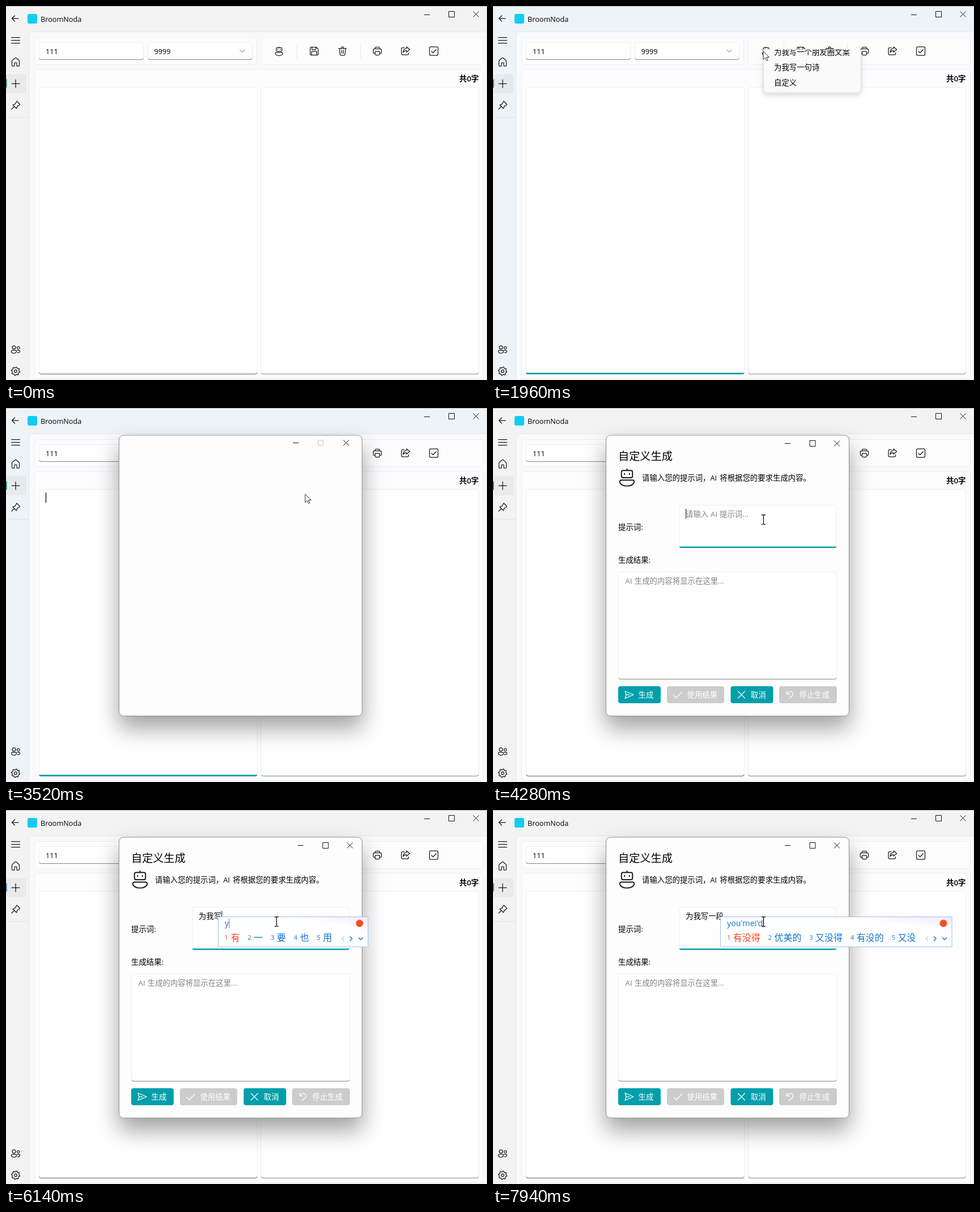
An HTML page that plays this animation: 849x660 px, repeating every 8 s.

```html
<!DOCTYPE html>
<html lang="zh-CN">
<head>
<meta charset="utf-8">
<title>BroomNoda</title>
<style>
html, body { margin: 0; width: 100%; height: 100%; overflow: hidden; background: #f3f3f3; }
svg { display: block; width: 849px; height: 660px; }
text { font-family: "Open Sans", "Noto Sans CJK SC", "Noto Sans CJK", sans-serif; font-size: 13.4px; white-space: pre; }
.lat { font-size: 12.7px; }
.hint { fill: #858585; }
.ico { fill: none; stroke: #1a1a1a; stroke-width: 1.25; stroke-linecap: round; stroke-linejoin: round; }
.cap { fill: none; stroke: #111; stroke-width: 1; }
</style>
</head>
<body>
<svg id="stage" viewBox="0 0 849 660" xmlns="http://www.w3.org/2000/svg"></svg>
<script>
const LOOP = 8000, STEP = 67.3;
const TEAL = '#009faa';
const stage = document.getElementById('stage');

// ---- drawing helpers ----
const rect = (x, y, w, h, r, fill, extra = '') =>
  `<rect x="${x}" y="${y}" width="${w}" height="${h}" rx="${r}" fill="${fill}" ${extra}/>`;
const card = (x, y, w, h, r = 4, fill = '#fcfcfc') =>
  rect(x + .5, y + .5, w - 1, h - 1, r, fill, 'stroke="#eeeeee"');
const text = (x, y, s, extra = '') => `<text x="${x}" y="${y}" ${extra}>${s}</text>`;
const icon = (x, y, d, extra = '') =>
  `<path class="ico" transform="translate(${x} ${y})" d="${d}" ${extra}/>`;
const caption = (x, y, d, extra = '') =>
  `<path class="cap" transform="translate(${x} ${y})" d="${d}" ${extra}/>`;
const underline = (x, y, w, color, thick, extra = '') =>
  `<path d="M${x + .7} ${y - 3}q.4 2.5 3.3 2.5h${w - 8}q2.9 0 3.3 -2.5" fill="none" stroke="${color}" stroke-width="${thick}" ${extra}/>`;
const focusLine = (id, x, y, w) =>
  `<path id="${id}" d="M${x} ${y - 2.6}h${w}q-.4 2.6 -3 2.6h${6 - w}q-2.600 0 -3 -2.6z" fill="${TEAL}"/>`;
const field = (x, y, w, h, color) =>
  card(x, y, w, h, 4, '#fefefe') + underline(x, y + h, w, color, 1);

const MIN = 'M-5 0H5', MAX = 'M-5 -5H5V5H-5Z', CLOSE = 'M-5 -5L5 5M5 -5L-5 5';
const ROBOT = 'M-3.500 -6.500h7q1.500 0 1.500 1.500v3.500q0 1.500 -1.500 1.500h-7q-1.500 0 -1.500 -1.500v-3.500q0 -1.500 1.500 -1.500zM0 -6.500v-1.300' +
  'M-2.200 -3.700v.8M2.200 -3.700v.8M-5 2.200h10q1.500 0 1.500 1.300c0 2.500 -3 4 -6.500 4s-6.500 -1.500 -6.500 -4q0 -1.300 1.500 -1.300z';
const SAVE = 'M-5.500 -7h9l3.500 3.500v9q0 1.500 -1.500 1.500h-11q-1.500 0 -1.500 -1.500v-11q0 -1.500 1.500 -1.500zM-4 -7v3.500q0 1 1 1h5q1 0 1 -1v-3.500M-4.500 7v-5.500q0 -1 1 -1h7q1 0 1 1v5.500';
const TRASH = 'M-7 -4.500h14M-2.200 -4.500q0 -2.800 2.200 -2.800t2.200 2.800M-5.500 -4.500l1.100 10.400q.2 1.600 1.700 1.600h5.400q1.500 0 1.700 -1.600l1.100 -10.400M-1.500 -1.500v5.500M1.500 -1.500v5.500';
const PRINT = 'M-4 -4v-1.500q0 -1.500 1.500 -1.500h5q1.500 0 1.500 1.500v1.500M-4 4h-1.500q-1.700 0 -1.700 -1.700v-3.800q0 -2.500 2.500 -2.500h9.400q2.500 0 2.500 2.500v3.800q0 1.700 -1.700 1.700h-1.500M-4 1.500q0 -1 1 -1h6q1 0 1 1v4q0 1.500 -1.500 1.500h-5q-1.500 0 -1.500 -1.500z';
const SHARE = 'M-2 -6h-3q-2 0 -2 2v8.500q0 2 2 2h8.500q2 0 2 -2v-1.500M2 -7.500l5.500 4.800l-5.500 4.800v-2.700q-4 0 -6 3q.4 -6.500 6 -7.100z';
const CHECK = 'M-5.500 -7.500h11q2 0 2 2v11q0 2 -2 2h-11q-2 0 -2 -2v-11q0 -2 2 -2zM-4 .5l2.700 2.700l5.500 -5.700';
const HOME = 'M-6.500 -1.500q0 -1 .8 -1.700l4.600 -4q1.100 -.9 2.200 0l4.600 4q.8 .7 .8 1.700v7.500q0 1.200 -1.200 1.200h-2.300q-1 0 -1 -1v-4q0 -1 -1 -1h-2q-1 0 -1 1v4q0 1 -1 1h-2.300q-1.200 0 -1.200 -1.200z';
const PIN = 'M2 -7l5 5q1 1.200 -.5 2l-3.300 1.600l-1.700 4.400l-6.500 -6.500l4.400 -1.700l1.600 -3.300q.5 -1.200 1 -1.500zM-2.700 2.800l-4.500 4.400';
const PEOPLE = 'M-6 -3.500a3 3 0 1 1 6 0a3 3 0 1 1 -6 0M2.500 -2.700a2.200 2.200 0 1 1 4.400 0a2.200 2.200 0 1 1 -4.400 0M-5.800 1.500h5.600q1.700 0 1.700 1.600c0 2.500 -2 3.700 -4.500 3.700s-4.500 -1.200 -4.500 -3.700q0 -1.600 1.700 -1.600zM3 1.500h3q1.600 0 1.600 1.500c0 2 -1.600 3 -4.100 2.700';

function gear() {
  let d = '';
  for (let i = 0; i < 32; i++) {
    const a = (i + .5) * Math.PI / 16, r = i % 4 < 2 ? 7.5 : 5.800;
    d += (i ? 'L' : 'M') + (r * Math.cos(a)).toFixed(1) + ' ' + (r * Math.sin(a)).toFixed(1);
  }
  return d + 'zM-2.300 0a2.300 2.300 0 1 1 4.600 0a2.300 2.300 0 1 1 -4.600 0';
}

function button(x, w, label, glyph, on) {
  return rect(x, 491, w, 30, 4, on ? TEAL : '#cccccc') +
    icon(x + 19, 506, glyph, 'style="stroke:#fff"') +
    text(x + 35.5, 511, label, 'fill="#fff"');
}

// ---- scene ----
const mainWindow = `
  <rect id="base" width="849" height="660"/>
  <path id="panel" d="M40.500 660V53.500q0 -8 8 -8H849V660z" stroke="#e6e8ea"/>
  <path d="M0 .5H849" stroke="#b9bbbd"/><path d="M848.500 0V660" stroke="#dedede"/>` +
  icon(16.5, 22, 'M5.500 0h-11.500M-1 -5l-5 5l5 5') +
  rect(38, 14, 17, 17, 3, '#12cdf2') +
  text(61, 27.5, 'BroomNoda', 'class="lat"') +
  caption(743, 15.5, MIN) + caption(786.5, 14.5, MAX) + caption(829.5, 14.5, CLOSE) +
  rect(0, 120, 36, 34, 4, '#000', 'fill-opacity=".04"') + rect(0, 129, 1.5, 15, .5, '#178089') +
  icon(17, 60.5, 'M-7.500 -5h15M-7.500 0h15M-7.500 5h15') + icon(17, 99, HOME) +
  icon(17, 137, 'M-7 0h14M0 -7v14') + icon(17, 175, PIN) +
  '<path d="M0 196.500H40" stroke="#000" stroke-opacity=".07"/>' +
  icon(17, 606, PEOPLE) + icon(17, 644.5, gear()) +
  card(50, 55, 393, 49, 5) + card(450, 55, 393, 49, 5) + card(50, 111, 793, 547, 5) +
  field(58, 64, 185, 31, '#858585') + field(250, 64, 185, 31, '#858585') +
  text(70, 84.5, '111', 'class="lat"') + text(261.5, 84.5, '9999', 'class="lat"') +
  icon(417, 79.5, 'M-4 -2l4 4l4 -4', 'style="stroke:#666;stroke-width:1"') +
  icon(482, 80, ROBOT) + icon(544, 79.5, SAVE) + icon(594, 79.5, TRASH) +
  icon(655.5, 79.5, PRINT) + icon(705, 79.5, SHARE) + icon(755, 79.5, CHECK) +
  '<path d="M513.500 65V94M625.500 65V94" stroke="#e8e8e8"/>' +
  text(834.5, 133, '共0字', 'text-anchor="end" font-weight="600"') +
  field(58, 143, 386, 507, '#616161') + field(450, 143, 385, 507, '#8a8a8a') +
  focusLine('editFocus', 58, 649.8, 385) +
  '<path id="editCaret" d="M70.500 149.500V167" stroke="#111" stroke-width="1.4"/>';

const menu = `<g id="menu" clip-path="url(#menuClip)"><g id="menuBody">` +
  rect(477.5, 85.5, 172, 91.5, 7, '#fafafa', 'stroke="#dcdcdc" filter="url(#soft)"') +
  rect(484, 0, 160, 26.5, 4, '#f0f0f0', 'id="hover"') +
  ['为我写一个朋友圈文案', '为我写一句诗', '自定义'].map((s, i) => text(496, 110 + i * 26.7, s)).join('') +
  '</g></g>';

const dialog = `<g id="dialog">` +
  rect(199.5, 48, 429, 495.5, 8, '#fdfdfd', 'stroke="#8d8d8d" filter="url(#deep)"') +
  '<g id="blank">' + caption(511.5, 61.5, MIN) + caption(555.5, 61.5, 'M-4.500 -4.500h9v9h-9z', 'style="stroke:#c4c4c4"') + caption(600.5, 61.5, CLOSE) + '</g>' +
  '<g id="form">' + caption(520, 62.5, MIN) + caption(564, 62.5, MAX) + caption(607, 62.5, CLOSE) +
  text(221, 91.5, '自定义生成', 'style="font-size:19.2px"') +
  `<path class="ico" transform="translate(236.500 123) scale(1.950)" style="stroke-width:1" d="${ROBOT}"/>` +
  text(263, 128, '请输入您的提示词，<tspan x="383.600" font-size="12.700">AI</tspan><tspan x="400.300">将根据您的要求生成内容。</tspan>') +
  text(221, 215, '提示词:') + text(221, 273, '生成结果:') +
  field(328.5, 171, 278, 76, '#8a8a8a') + focusLine('askFocus', 329, 247, 277) +
  text(340, 192, '请输入 <tspan x="384">AI</tspan><tspan x="400">提示词...</tspan>', 'id="ask" class="hint"') +
  text(340, 192, '', 'id="typed"') +
  '<path id="askCaret" stroke="#222" stroke-width="1.1"/>' +
  field(221, 288.5, 386, 190.5, '#8a8a8a') +
  text(233.5, 310, 'AI <tspan x="249.800">生成的内容将显示在这里...</tspan>', 'class="hint"') +
  button(221, 75, '生成', 'M-7 -6.500L8 0L-7 6.500L-5 0zM-5 0h6', true) +
  button(307, 101, '使用结果', 'M-7 1l4.500 4.500L7 -4.500', false) +
  button(419.5, 75, '取消', 'M-6 -6L6 6M6 -6L-6 6', true) +
  button(505, 102, '停止生成', 'M-5.500 -6.500v5h5M-5.500 -1.500c3 -5 8 -5.500 10 -2.500s1 5 -1 6.500l-5 4', false) +
  '</g></g>';

stage.innerHTML = `<defs>
  <filter id="deep" x="-20%" y="-20%" width="140%" height="145%"><feDropShadow dx="0" dy="21" stdDeviation="19" flood-opacity=".36"/></filter>
  <filter id="soft" x="-15%" y="-15%" width="130%" height="140%"><feDropShadow dx="0" dy="4" stdDeviation="4" flood-opacity=".14"/></filter>
  <linearGradient id="lilac" x1="0" y1="1" x2="1" y2="0"><stop offset=".75" stop-color="#fff"/><stop offset="1" stop-color="#f0e9fa"/></linearGradient>
  <clipPath id="menuClip"><rect x="460" y="76.500" width="210" height="130"/></clipPath>
  </defs>` + mainWindow + menu + dialog +
  `<g id="ime"></g>
  <path id="arrow" d="M0 0V14.500L3.400 11.300L5.800 16.600L8.100 15.600L5.800 10.500H10.500Z" fill="#fff" stroke="#263240" stroke-width="1"/>
  <path id="beam" d="M-3.500 -8.500Q-.5 -8.500 0 -7.500Q.5 -8.500 3.500 -8.500M0 -7.500V7.500M-3.500 8.500Q-.5 8.500 0 7.500Q.5 8.500 3.500 8.500" fill="none" stroke="#111" stroke-width="1.300"/>`;

const $ = id => document.getElementById(id);
const show = (id, on) => $(id).setAttribute('display', on ? 'inline' : 'none');
const put = (id, name, v) => $(id).setAttribute(name, v);

// ---- timeline ----
const pointer = [[200, 647, 324], [590, 647, 324], [740, 562, 181], [1060, 562, 181], [1480, 477, 80],
  [2420, 477, 80], [2640, 531, 109], [2760, 531, 109], [3160, 528, 152], [3700, 528, 152], [3960, 477.5, 197]];

const commits = [[0, ''], [5340, '为我'], [5810, '为我写'], [6680, '为我写一段']];

// time, pinyin, candidates; an empty pinyin closes the list
const typing = [
  [5080, 'w', '我 为 无 问 玩'], [5140, 'wei', '为 位 未 喂 微'],
  [5210, "wei'w", '为我 为为 维稳 慰问 违误'], [5280, "wei'wo", '为我 喂我 微我 唯我 帷幄'], [5340, ''],
  [5540, 'x', '想 下 小 写 需'], [5610, 'xi', '系 洗 西 喜 细'], [5740, 'xie', '写 些 谢 鞋 歇'], [5810, ''],
  [6140, 'y', '有 一 要 也 用'], [6210, 'yi', '一 以 已 亿 易'], [6340, "yi'd", '一点 一定 一段 已到 一大'],
  [6480, "yi'du", '一度 已读 一堵 异度 一读'], [6550, "yi'dua", '一段 一端 异端 一断 已断'],
  [6610, "yi'duan", '一段 一端 异端 一断 已断'], [6680, ''],
  [7280, 'yo', '哟 有 又 由 用'], [7410, 'you', '有 又 由 游 右'],
  [7610, "you'm", '有没 有吗 优美 幽默 油门'], [7740, "you'me", '有么 有没 优美 又么 有门'],
  [7870, "you'mei", '有没 优美 又没 有美 油煤'], [7940, "you'mei'd", '有没得 优美的 又没得 有没的 又没']];

const last = (list, t) => list.reduce((a, k) => k[0] <= t ? k : a, null);
const clamp = v => Math.max(0, Math.min(1, v));

function pointerAt(t) {
  const i = pointer.findIndex(k => k[0] > t);
  if (i < 0) return pointer[pointer.length - 1].slice(1);
  const [t0, x0, y0] = pointer[Math.max(0, i - 1)], [t1, x1, y1] = pointer[i];
  const p = clamp((t - t0) / (t1 - t0 || 1));
  return [x0 + (x1 - x0) * p, y0 + (y1 - y0) * p];
}

let imeKey = null;
function drawIme(entry, caretX, first) {
  const key = entry && entry[1] ? entry[0] : 0;
  if (key === imeKey) return;
  imeKey = key;
  if (!key) { $('ime').innerHTML = ''; return; }
  const x = first ? 347.5 : Math.round(caretX) - 6.5, y = first ? 207.5 : 188.5;
  let cx = x + 11.5, list = '';
  entry[2].split(' ').forEach((word, i) => {
    const color = i ? '#1273d2' : '#f4451c';
    list += text(cx, y + 40, i + 1, `style="font-size:11px" fill="${color}"`) +
      text(cx + 10.7, y + 42.5, word, `style="font-size:16px" fill="${color}"`);
    cx += 24.7 + word.length * 16;
  });
  const end = cx - 14 + 63.5;
  const arrow = (dx, d, color) =>
    `<path d="M${end - dx} ${y + 38.5}${d}" fill="none" stroke="${color}" stroke-width="1.400"/>`;
  $('ime').innerHTML = rect(x, y, end - x, 53, 1, 'url(#lilac)', 'stroke="#9fc3ea"') +
    text(x + 11.5, y + 16.5, entry[1], 'id="pinyin" style="font-size:14.3px" fill="#1273d2"') + list +
    arrow(42, 'm0 -4l-4 4l4 4', '#c3cbd4') + arrow(32, 'm0 -4l4 4l-4 4', '#1273d2') +
    arrow(17, 'm0 -2l4 4l4 -4', '#1273d2') +
    `<circle cx="${end - 15}" cy="${y + 11.5}" r="6.500" fill="#ef5220"/>`;
  const w = $('pinyin').getComputedTextLength();
  $('ime').insertAdjacentHTML('beforeend',
    `<path d="M${x + 12.3 + w} ${y + 3}v17" stroke="#f4451c"/>`);
}

function render(t) {
  const q = 200 + Math.floor((t - 200) / STEP + .01) * STEP;
  const active = t >= 1820 && t < 3720;
  put('base', 'fill', active ? '#eef3f7' : '#f3f3f3');
  put('panel', 'fill', active ? '#f8fafd' : '#f9f9f9');
  show('editFocus', active);
  show('editCaret', t >= 3320 && t < 3720);

  const [px, py] = pointerAt(q);
  const beam = t < 1140 || t >= 3860;
  show('beam', t >= 200 && beam);
  show('arrow', !beam);
  put(beam ? 'beam' : 'arrow', 'transform', `translate(${px} ${py})`);

  show('menu', t >= 1890 && t < 3320);
  const slide = -90 * (1 - clamp((q - 1890) / 167)) ** 3;
  put('menuBody', 'transform', `translate(0 ${slide})`);
  const item = Math.floor((py - 91) / 26.7);
  show('hover', item >= 0 && item < 3);
  put('hover', 'y', 91.5 + item * 26.7);

  show('dialog', t >= 3390);
  const grow = 1 - (1 - clamp((q - 3300) / 200)) ** 3, s = .9 + .1 * grow;
  put('dialog', 'opacity', grow);
  put('dialog', 'transform', `translate(${414 * (1 - s)} ${296 * (1 - s)}) scale(${s})`);
  show('blank', t < 3720);
  show('form', t >= 3720);
  show('askFocus', t >= 4070);

  const typed = last(commits, t)[1], caretX = 340.6 + typed.length * 13.4;
  $('typed').textContent = typed;
  show('ask', !typed);
  const caretOn = t >= 4140 && !(t >= 4750 && t < 5080) && !(t >= 6880 && t < 7410) && t < 7940;
  show('askCaret', caretOn);
  put('askCaret', 'd', `M${caretX} 178V195.500`);
  drawIme(last(typing, t), caretX, t < 5340);
}

const start = performance.now();
function tick() {
  render((performance.now() - start) % LOOP);
  requestAnimationFrame(tick);
}
tick();
</script>
</body>
</html>
```
